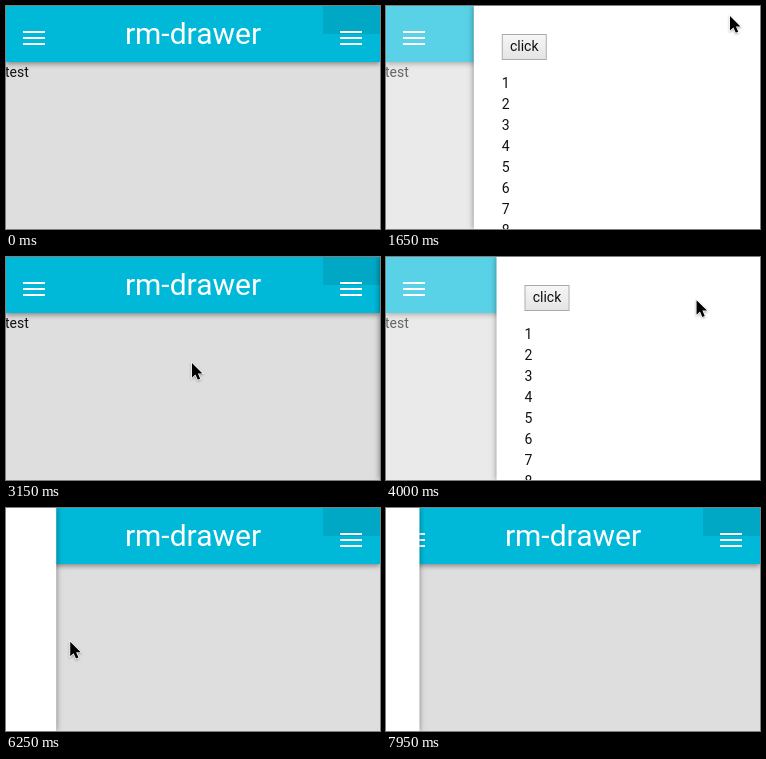
Recreate the animation shown at these times as an HTML page. Size 374x223 px, loop 8000 ms.

```html
<!DOCTYPE html>
<html lang="en">
<head>
<meta charset="utf-8">
<title>Drawer demo</title>
<style>
  html, body { margin: 0; width: 100%; height: 100%; overflow: hidden; }
  #stage {
    position: relative; width: 374px; height: 223px; overflow: hidden;
    background: #dedede; color: #111; font: 14px/21px Roboto, sans-serif;
  }
  #stage * { position: absolute; box-sizing: border-box; }
  header {
    width: 374px; height: 56px; background: #00b9d9; color: #fff;
    box-shadow: 0 2px 5px rgba(0, 0, 0, .4);
  }
  .patch { left: 317px; width: 57px; height: 28px; background: #00a8c6; }
  .title { width: 374px; top: 8px; font-size: 30px; line-height: 40px; text-align: center; }
  .menu { top: 25px; width: 22px; height: 14px; border: solid #fff; border-width: 2px 0; }
  .menu::after { content: ""; position: absolute; top: 4px; width: 22px; height: 2px; background: #fff; }
  .test { left: -1px; top: 56px; }
  #overlay { inset: 0; background: rgba(255, 255, 255, .35); }
  .drawer { top: 0; width: 300px; height: 223px; background: #fff; }
  #left { left: -300px; }
  #right { left: 374px; }
  .button {
    left: 28px; top: 28px; width: 45px; height: 26px; line-height: 23px; text-align: center;
    border: 1px solid #a9a9a9; background: linear-gradient(#f6f6f6, #e4e4e4);
  }
  .list { left: 28px; top: 67px; white-space: pre; }
  #cursor { left: 0; top: 0; overflow: visible; filter: drop-shadow(0 1px 1px rgba(0, 0, 0, .3)); }
</style>
</head>
<body>
<div id="stage">
  <div class="test">test</div>
  <header>
    <div class="patch"></div>
    <div class="title">rm-drawer</div>
    <div class="menu" style="left:17px"></div>
    <div class="menu" style="left:334px"></div>
  </header>
  <div id="overlay"></div>
  <div id="left" class="drawer"><div class="button">click</div></div>
  <div id="right" class="drawer">
    <div class="button">click</div>
    <div class="list">1
2
3
4
5
6
7
8</div>
  </div>
  <svg id="cursor" width="12" height="18">
    <path d="M0 0V14.5L3.4 11.4 5.8 16.8 8.2 15.8 5.9 10.4H10.5Z" stroke="#fff" stroke-width="1.4" paint-order="stroke"/>
  </svg>
</div>
<script>
const LOOP = 8000, WIDTH = 300, SLIDE = 400, SHADOW_LINGER = 900;
const $ = id => document.getElementById(id);
const left = $('left'), right = $('right'), overlay = $('overlay'), cursor = $('cursor');

const rightOpen = [[1358, 2670], [3765, 4730]];
const drag = { start: 6000, release: 6700, grab: 7210, drop: 7820 };

// Pointer stops: time, x, y, and whether the move to it is linear
const stops = [
  [250, -12, 200], [450, 140, 100], [850, 140, 100], [1200, 344, 10], [1650, 344, 10],
  [2350, 56, 150], [2750, 56, 150], [3150, 186, 106, true], [3600, 347, 30], [3850, 347, 30],
  [4550, 42, 140], [4900, 42, 140], [5650, 14, 136], [6000, 14, 136], [6767, 214, 127],
  [7100, 223, 118], [7210, 223, 118], [7820, 0, 126, true], [7900, -30, 127, true]
];

function pointer(t) {
  const i = stops.findIndex(stop => t < stop[0]);
  if (i < 1) return [-30, 0];
  const [t0, x0, y0] = stops[i - 1], [t1, x1, y1, linear] = stops[i];
  const u = (t - t0) / (t1 - t0), k = linear ? u : u * u * (3 - 2 * u);
  return [x0 + (x1 - x0) * k, y0 + (y1 - y0) * k];
}

// CSS "ease": cubic-bezier(.25, .1, .25, 1)
function ease(x) {
  if (x <= 0) return 0;
  if (x >= 1) return 1;
  const curve = (a, b, s) => 3 * a * s * (1 - s) ** 2 + 3 * b * s * s * (1 - s) + s ** 3;
  let lo = 0, hi = 1;
  for (let i = 0; i < 24; i++) {
    const mid = (lo + hi) / 2;
    if (curve(.25, .25, mid) < x) lo = mid; else hi = mid;
  }
  return curve(.1, 1, lo);
}

const slide = (from, to, start, t) => from + (to - from) * ease((t - start) / SLIDE);

function rightReveal(t) {
  return rightOpen.reduce((sum, [open, close]) =>
    sum + slide(0, WIDTH, open, t) - slide(0, WIDTH, close, t), 0);
}

function leftReveal(t) {
  const { start, release, grab, drop } = drag;
  const pulled = time => pointer(time)[0] - pointer(start)[0];
  const pushed = time => WIDTH + pointer(time)[0] - pointer(grab)[0];
  if (t < start) return 0;
  if (t < release) return pulled(t);
  if (t < grab) return slide(pulled(release), WIDTH, release, t);
  if (t < drop) return pushed(t);
  return slide(pushed(drop), 0, drop, t);
}

const within = (t, a, b) => t >= a && t < b;

function place(drawer, x, shadow) {
  drawer.style.transform = `translateX(${x}px)`;
  drawer.style.boxShadow = shadow ? '0 0 6px rgba(0, 0, 0, .5)' : 'none';
}

function draw(now) {
  const t = now % LOOP;
  place(left, leftReveal(t), t >= drag.start);
  place(right, -rightReveal(t), rightOpen.some(([a, b]) => within(t, a, b + SHADOW_LINGER)));
  const covered = rightOpen.some(([a, b]) => within(t, a, b)) || within(t, drag.release, drag.drop);
  overlay.style.visibility = covered ? 'visible' : 'hidden';
  const [x, y] = pointer(t);
  cursor.style.transform = `translate(${x}px, ${y}px)`;
  requestAnimationFrame(() => draw(performance.now() - origin));
}

const origin = performance.now();
draw(0);
</script>
</body>
</html>
```
